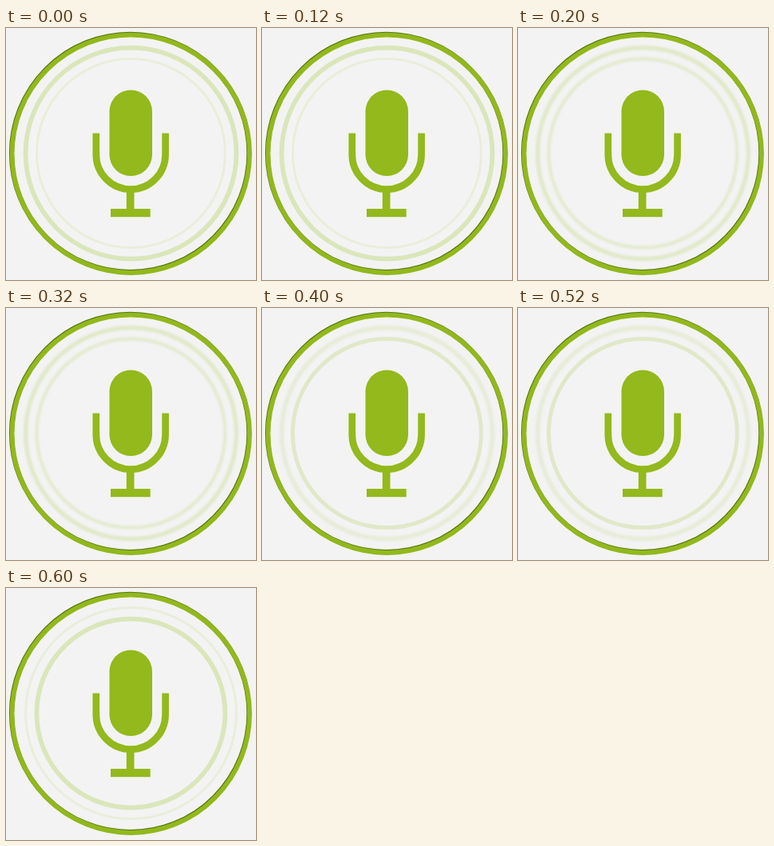
These frames come from a looping animation (313x315 px, 0.7 s). An HTML page:

```html
<!DOCTYPE html>
<html lang="en">
<head>
<meta charset="utf-8">
<title>Listening microphone</title>
<style>
  html, body { margin: 0; width: 100%; height: 100%; overflow: hidden; background: #f3f3f3; }
  svg { display: block; width: 100%; height: 100%; }
  .ring { fill: none; }
</style>
</head>
<body>
<svg viewBox="0 0 313 315">
  <circle class="ring" cx="155.6" cy="156.4" r="148.7" stroke="#56750f" stroke-width="6"/>
  <circle class="ring" cx="156.3" cy="157.3" r="148.7" stroke="#92b81c" stroke-width="5.8"/>

  <circle class="ring" id="outer" cx="156.5" cy="156.6" r="132"/>
  <circle class="ring" id="inner" cx="156.4" cy="156.6" r="118"/>

  <g fill="#93b91c">
    <rect x="129.5" y="77.5" width="53.5" height="107.5" rx="26.75"/>
    <path d="M112.8 131.5V158A43.4 43.7 0 0 0 199.6 158V131.5" fill="none" stroke="#93b91c" stroke-width="8.7"/>
    <rect x="150.8" y="203" width="9.7" height="24"/>
    <rect x="131" y="226" width="49.7" height="10.2"/>
  </g>
</svg>
<script>
  const LOOP = 700;
  const STARTS = [0, 200, 400, 600];

  // Each look: stroke colour, stroke width, blur in pixels.
  const strong = ['#dae6ba', 5.8, 0];
  const fading = ['#e1e9ca', 5.6, 0.8];
  const soft = ['#e7ecd8', 5.6, 1.3];
  const thin = ['#e8eed9', 3, 0];

  function pulse(id, looks) {
    const steps = looks.concat([looks[looks.length - 1]]).map(([stroke, width, blur], i) => ({
      offset: i < STARTS.length ? STARTS[i] / LOOP : 1,
      stroke,
      strokeWidth: width + 'px',
      filter: `blur(${blur}px)`,
      easing: 'steps(1, end)'
    }));
    document.getElementById(id).animate(steps, { duration: LOOP, iterations: Infinity });
  }

  pulse('outer', [strong, fading, soft, thin]);
  pulse('inner', [thin, ['#e4ebd1', 4.6, 0.8], ['#e0e8c9', 5, 0.3], strong]);
</script>
</body>
</html>
```
